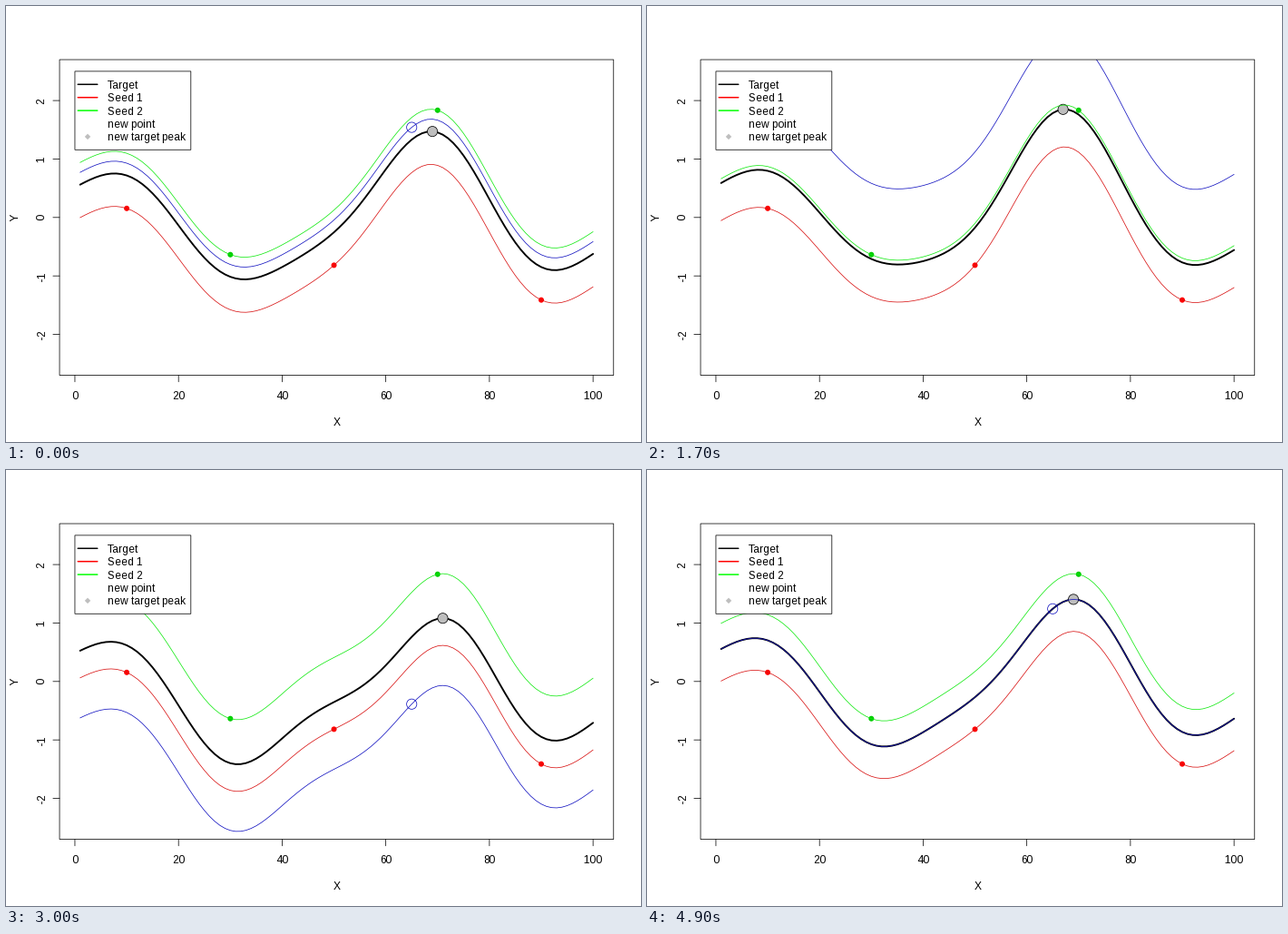
Animation, 700 px wide and 480 px high, one loop 5000 ms. Source, as a matplotlib script:

```python
import numpy as np
import matplotlib.pyplot as plt
from matplotlib.animation import FuncAnimation
from matplotlib.patches import Circle, Polygon, Rectangle

W, H, DPI = 700, 480, 100
PX = 72 / DPI                      # one pixel in points
THIN = 0.75                        # thin stroke in pixels
FRAMES = 50
LEFT, RIGHT, TOP, BOTTOM = 59.04, 669.76, 59.04, 406.56
GREY = "#bebebe"
CURVES = ["#d81010", "#10ea10", "#1010c0"]

plt.rcParams.update({"font.family": "Liberation Sans",
                     "font.size": 12 * PX,
                     "text.hinting_factor": 1,
                     "path.snap": False})


def px(x):
    return LEFT + (np.asarray(x) + 2.96) * (RIGHT - LEFT) / 106.92


def py(y):
    return TOP + (2.7 - np.asarray(y)) * (BOTTOM - TOP) / 5.4


# Gaussian process: shared smooth curve plus a random offset per seed
obs_x = np.array([10, 50, 90, 30, 70])
obs_y = np.array([0.155, -0.817, -1.412, -0.636, 1.834])
new_x = 65
all_x = np.append(obs_x, new_x)
group = np.array([0, 0, 0, 1, 1, 2])
grid = np.arange(1, 101)


def kernel(a, b):
    return np.exp(-np.subtract.outer(a, b) ** 2 / 200)


cov = kernel(all_x, all_x) + np.equal.outer(group, group)
link = np.linalg.solve(cov[:5, :5], cov[:5, 5])
mean = link @ obs_y
sd = np.sqrt(cov[5, 5] - link @ cov[:5, 5])


def fit(y_new):
    weights = np.linalg.solve(cov, np.append(obs_y, y_new))
    offsets = [weights[group == g].sum() for g in range(3)]
    return kernel(grid, all_x) @ weights, offsets


fig = plt.figure(figsize=(W / DPI, H / DPI), dpi=DPI, facecolor="white")
ax = fig.add_axes([0, 0, 1, 1])
ax.set_xlim(0, W)
ax.set_ylim(H, 0)
ax.axis("off")
area = Rectangle((LEFT, TOP), RIGHT - LEFT, BOTTOM - TOP,
                 transform=ax.transData)


def line(xs, ys, color="black", width=THIN, z=6):
    return ax.plot(xs, ys, color=color, lw=width * PX, zorder=z,
                   solid_capstyle="round", solid_joinstyle="round")[0]


def curve(color, width, z):
    artist = line([], [], color, width, z)
    artist.set_clip_path(area)
    return artist


def disc(x, y, radius, z, face="none", edge="none"):
    artist = ax.add_patch(Circle((px(x), py(y)), radius, facecolor=face,
                                 edgecolor=edge, lw=THIN * PX, zorder=z))
    artist.set_clip_path(area)
    return artist


def label(x, y, text, ha="center", rotation=0):
    ax.text(x, y, text, ha=ha, va="baseline", rotation=rotation,
            rotation_mode="anchor", zorder=9)


def box(x0, y0, x1, y1, face, z):
    ax.add_patch(Rectangle((x0, y0), x1 - x0, y1 - y0, facecolor=face,
                           edgecolor="black", lw=THIN * PX, zorder=z))


# axes
box(LEFT, TOP, RIGHT, BOTTOM, "none", 6)
for v in range(0, 101, 20):
    line([px(v)] * 2, [BOTTOM, BOTTOM + 7.2])
    label(px(v), 433, str(v))
for v in range(-2, 3):
    line([LEFT - 7.2, LEFT], [py(v)] * 2)
    label(42.5, py(v), str(v), rotation=90)
label((LEFT + RIGHT) / 2, 461.6, "X")
label(13, (TOP + BOTTOM) / 2, "Y", rotation=90)

# legend
box(75.95, 71.9, 203.8, 158.3, "white", 7)
names = ["Target", "Seed 1", "Seed 2", "new point", "new target peak"]
rows = 71.9 + 14.4 * np.arange(1, 6)
for row, name in zip(rows, names):
    label(112, row + 4.5, name, ha="left")
for row, color in zip(rows, ["black", "red", "lime"]):
    line([79.2, 100.8], [row, row], color, 2 * THIN, 8)
d = 3.2
ax.add_patch(Polygon([(90 - d, rows[4]), (90, rows[4] - d),
                      (90 + d, rows[4]), (90, rows[4] + d)],
                     facecolor=GREY, edgecolor="none", zorder=8))

# data
for x, y, g in zip(obs_x, obs_y, group):
    disc(x, y, 3, 1, face=("red", "#00cd00")[g])
target = curve("black", 1.9, 2)
peak = disc(0, 0, 5.6, 3, face=GREY, edge="black")
seeds = [curve(c, THIN, 4) for c in CURVES]
point = disc(new_x, 0, 5.6, 5, edge=CURVES[2])


def draw(i):
    y_new = mean + 2 * sd * np.sin(2 * np.pi * (i + 1) / FRAMES)
    base, offsets = fit(y_new)
    target.set_data(px(grid), py(base))
    for artist, offset in zip(seeds, offsets):
        artist.set_data(px(grid), py(base + offset))
    top = base.argmax()
    peak.center = px(grid[top]), py(base[top])
    point.center = px(new_x), py(y_new)
    return [target, peak, point, *seeds]


anim = FuncAnimation(fig, draw, frames=FRAMES, interval=100,
                     repeat=True, repeat_delay=0)
plt.show()
```
